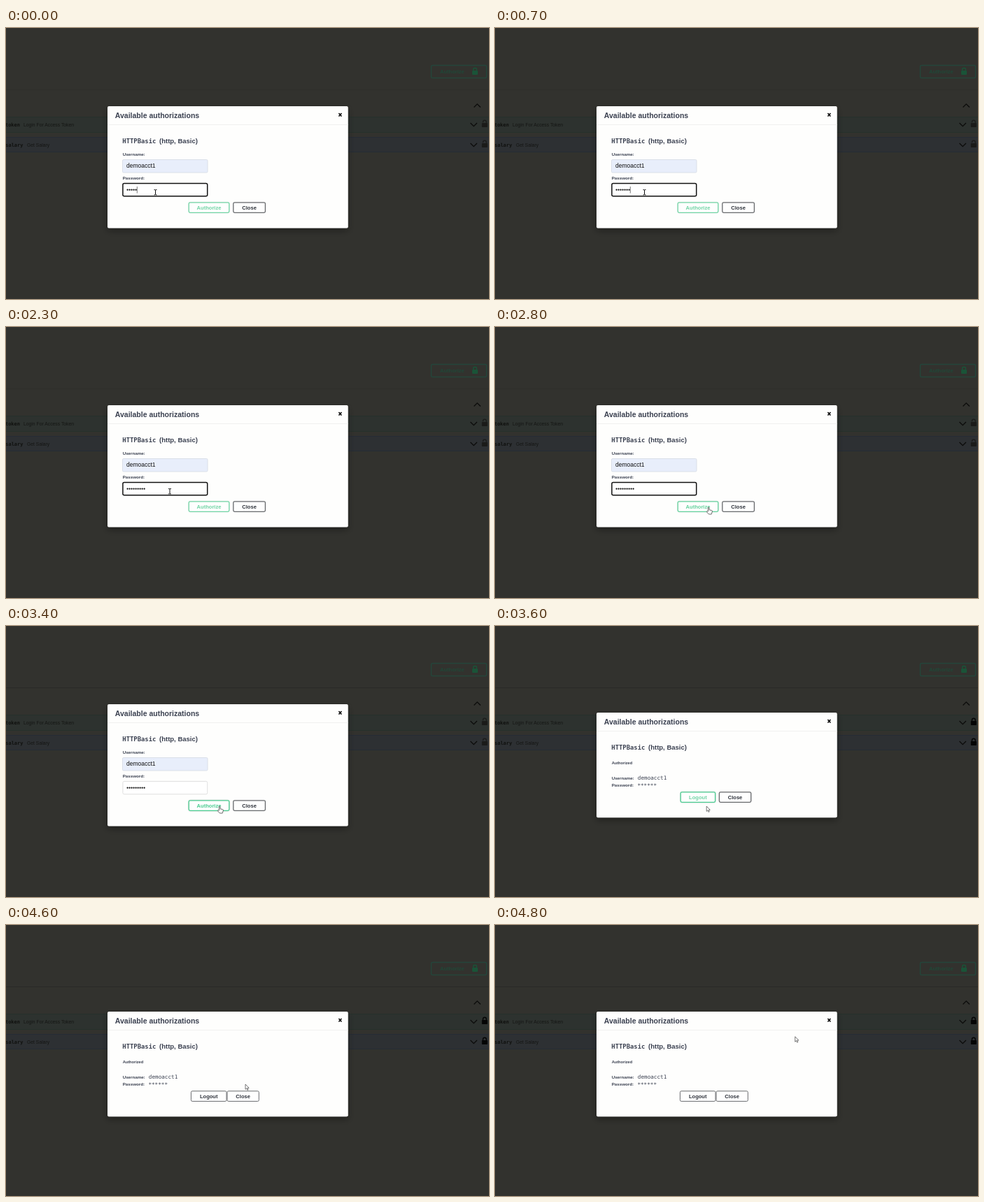
An HTML page for the animation above (4900 ms loop, 690x388 px).

```html
<!DOCTYPE html>
<html lang="en">
<head>
<meta charset="utf-8">
<title>Available authorizations</title>
<style>
html, body { margin: 0; width: 100%; height: 100%; overflow: hidden; background: #32322e; }
svg { display: block; width: 690px; height: 388px; }
text { font-family: "Liberation Sans", Arial, sans-serif; fill: #3b4151; white-space: pre; }
.b { font-weight: 700; }
.mono { font-family: "DejaVu Sans Mono", monospace; }
.mid { text-anchor: middle; }
.end { text-anchor: end; }
.title { font-size: 10.5px; }
.label { font-size: 6.2px; }
.btn text { font-size: 7.55px; font-weight: 700; text-anchor: middle; }
.path { font-size: 7px; fill: #10110f; }
.note { font-size: 6.8px; fill: #151614; }
.chev { fill: none; stroke: #0c0c0b; stroke-width: 1.3; }
</style>
</head>
<body>
<svg viewBox="0 0 690 388" xmlns="http://www.w3.org/2000/svg">
  <defs>
    <filter id="drop" x="-10%" y="-15%" width="120%" height="135%">
      <feDropShadow dx="0" dy="4" stdDeviation="5" flood-color="#000" flood-opacity=".35"/>
    </filter>
    <filter id="glow" x="-20%" y="-50%" width="140%" height="200%">
      <feGaussianBlur stdDeviation="1.3"/>
    </filter>
    <g id="closed">
      <rect x="-4" y="-1" width="8" height="6" rx=".8"/>
      <path d="M-2.4 0V-2.4a2.4 2.4 0 0 1 4.8 0V0" fill="none" stroke="currentColor" stroke-width="1.4"/>
    </g>
    <g id="open">
      <rect x="-4" y="-1" width="8" height="6" rx=".8"/>
      <path d="M2.4 0V-2.4a2.4 2.4 0 0 0 -4.8 0V-1.8" fill="none" stroke="currentColor" stroke-width="1.2"/>
    </g>
  </defs>

  <!-- dimmed page -->
  <rect width="690" height="388" fill="#32322e"/>
  <path id="rule" d="M0 88.5H690" stroke="#292927"/>
  <rect x="607.5" y="53.5" width="79" height="18" rx="2" fill="none" stroke="#24453a" stroke-width="1.4"/>
  <text class="b" x="620" y="65" font-size="7.55" style="fill:#204838">Authorize</text>
  <use href="#closed" x="670" y="62" fill="#1a5338" color="#1a5338"/>
  <path class="chev" d="M668.5 113.5l4.7-4.7 4.7 4.7"/>
  <rect x="-5" y="127.5" width="700" height="22" fill="#2d322f" stroke="#26302b"/>
  <rect x="-5" y="156.5" width="700" height="21" fill="#2d3033" stroke="#252c35"/>
  <text class="path b mono end" x="20" y="141">/token</text>
  <text class="note" x="25" y="140.7">Login For Access Token</text>
  <text class="path b mono end" x="24.5" y="170">/salary</text>
  <text class="note" x="30" y="169.7">Get Salary</text>
  <path class="chev" d="M663.5 136l4.7 4.7 4.7-4.7M663.5 165l4.7 4.7 4.7-4.7"/>
  <g id="unlocked" fill="#1b1b19" color="#1b1b19">
    <use href="#open" x="683.8" y="137"/><use href="#open" x="683.8" y="166"/>
  </g>
  <g id="locked" fill="#050505" color="#050505">
    <use href="#closed" x="683.8" y="137"/><use href="#closed" x="683.8" y="166"/>
  </g>

  <!-- dialog -->
  <rect id="panel" x="145" width="343.7" rx="2" fill="#fefefd" filter="url(#drop)"/>
  <g id="head">
    <text class="title b" x="155.8" y="128.5">Available authorizations</text>
    <path d="M475.4 122l4 4.6M479.4 122l-4 4.6" stroke="#080808" stroke-width="1.6"/>
    <path d="M145 138.5H488.7" stroke="#ececec" stroke-width=".8"/>
    <text class="b mono" x="166.3" y="165" font-size="8.87">HTTPBasic</text>
    <text class="b" x="219" y="165" font-size="9.5">(http, Basic)</text>
  </g>

  <g id="form">
    <text class="label b" x="166.7" y="183">Username:</text>
    <rect x="166.5" y="188.5" width="121.5" height="18.5" rx="1.5" fill="#e8eefb" stroke="#d5dae4" stroke-width=".8"/>
    <text x="172" y="200.4" font-size="8.5" style="fill:#111">demoacct1</text>
    <text class="label b" x="166.7" y="217.3">Password:</text>
    <rect id="field" x="166.9" y="222.4" width="120.8" height="18.4" rx="2" fill="#fff"/>
    <g id="dots" fill="#111"></g>
    <path id="caret" d="M0 227V236.5" stroke="#555" stroke-width=".8"/>
  </g>

  <g id="done">
    <text class="b" x="166.7" y="198" font-size="5.65">Authorized</text>
    <text class="label b" x="166.7" y="220">Username:</text>
    <text class="mono" x="203.8" y="220.3" font-size="7.66">demoacct1</text>
    <text class="label b" x="166.7" y="229.8">Password:</text>
    <text class="mono" x="203.4" y="230.6" font-size="7.66">******</text>
  </g>
  <g id="buttons"></g>

  <!-- pointers -->
  <path id="beam" d="M-2-3.6H-.5L0-3.2 .5-3.6H2M0-3.2V3.2M-2 3.6H-.5L0 3.2 .5 3.6H2" fill="none" stroke="#111" stroke-width="1"/>
  <path id="arrow" d="M0 0V7.4L1.7 5.8 2.9 8.4 4.1 7.8 2.9 5.3H5.1Z" fill="#fff" stroke="#555" stroke-width=".8" stroke-linejoin="round"/>
  <path id="hand" d="M1.4 6V.9a.8.8 0 0 1 1.6 0V3.8L6.6 4.6a1 1 0 0 1 .8 1L6.8 8.2 6.2 10H2.4L-.4 6.9a.7.7 0 0 1 1-1Z" fill="#fff" stroke="#444" stroke-width=".8" stroke-linejoin="round"/>
</svg>
<script>
const LOOP = 4900, STEP = 100;
const $ = id => document.getElementById(id);
const NS = 'http://www.w3.org/2000/svg';
const GREEN = [73, 204, 144], PALE = [112, 212, 164], DARK = [45, 49, 58], GREY = [105, 107, 110];

function make(tag, parent, attrs = {}) {
  const el = document.createElementNS(NS, tag);
  set(el, attrs);
  return parent.appendChild(el);
}
function set(el, attrs) {
  for (const k in attrs) el.setAttribute(k, attrs[k]);
}
const show = (el, on) => el.setAttribute('visibility', on ? 'visible' : 'hidden');
const lerp = (a, b, u) => a + (b - a) * u;
const mix = (a, b, u) => `rgb(${a.map((v, i) => Math.round(lerp(v, b[i], u)))})`;
const ramp = (t, from, to) => Math.min(1, Math.max(0, (t - from) / (to - from)));

function button(label) {
  const g = make('g', $('buttons'), { class: 'btn' });
  const glow = make('rect', g, { rx: 2, fill: '#000', filter: 'url(#glow)' });
  const box = make('rect', g, { rx: 1.8, fill: '#fefefe' });
  const text = make('text', g);
  text.textContent = label;
  return { g, glow, box, text };
}
function place(b, x, y, w, line, ink, glow, weight = 1.3) {
  const size = { x, y, width: w, height: 14.6 };
  set(b.glow, { ...size, opacity: glow });
  set(b.box, { ...size, stroke: line, 'stroke-width': weight });
  set(b.text, { x: x + w / 2, y: y + 9.9 });
  b.text.style.fill = ink;
}

const authorize = button('Authorize'), close = button('Close'), logout = button('Logout');
const dots = Array.from({ length: 9 }, (_, i) =>
  make('circle', $('dots'), { cx: 173.6 + 3 * i, cy: 231.7, r: 1.15 }));

const typed = [[0, 5], [100, 6], [700, 7], [900, 8], [1300, 9]];
// time, x, y, pointer shape
const mouse = [
  [0, 213.5, 235.2, 'beam'], [2300, 234, 235.2, 'beam'], [2400, 255, 238, 'beam'],
  [2500, 274, 245, 'arrow'], [2600, 290, 252, 'hand'], [2700, 299, 256, 'hand'],
  [2800, 303, 258, 'hand'], [3600, 302.2, 258, 'arrow'], [4600, 342, 228, 'arrow'],
  [4700, 398, 184, 'arrow'], [4800, 428.7, 159.8, 'arrow']
];
const at = (table, t) => table.filter(row => row[0] <= t).pop();

function draw(time) {
  const t = Math.floor(time / STEP) * STEP;
  const done = t >= 3600, focused = t < 3400;

  set($('rule'), { opacity: t < 2900 ? .4 : 1 });
  show($('locked'), done);
  show($('unlocked'), !done);
  set($('panel'), done ? { y: 124, height: 150.3 } : { y: 112, height: 174.5 });
  set($('head'), { transform: `translate(0 ${done ? 12 : 0})` });
  $('form').style.display = done ? 'none' : '';
  $('done').style.display = done ? '' : 'none';
  authorize.g.style.display = done ? 'none' : '';
  logout.g.style.display = done ? '' : 'none';

  const count = at(typed, t)[1];
  dots.forEach((dot, i) => show(dot, i < count));
  set($('caret'), { transform: `translate(${172.3 + 3 * count} 0)` });
  show($('caret'), !done && (t < 1800 || (t >= 2400 && t < 2800)));
  set($('field'), focused ? { stroke: '#111', 'stroke-width': 1.5 } : { stroke: '#d8d8d8', 'stroke-width': .8 });

  if (done) {
    const u = ramp(t, 3600, 3900), w = lerp(1.3, 1, u);
    place(logout, lerp(265.2, 264.4, u), 237.8, lerp(49.4, 50.6, u), mix(GREEN, GREY, u), mix(PALE, DARK, u), .3 * (1 - u), w);
    place(close, lerp(320.4, 316, u), 237.8, 45.3, mix(GREY, GREY, u), mix(DARK, DARK, u), .15 * (1 - u), w);
  } else {
    const hover = ramp(t, 2700, 3000);
    place(authorize, 261.2, 249.8, 57.6, mix(PALE, GREEN, hover), mix(PALE, GREEN, hover), lerp(.13, .35, hover));
    place(close, 324.8, 249.8, 45.6, mix(GREY, GREY, 0), mix(DARK, DARK, 0), .13);
  }

  const [, x, y, shape] = at(mouse, t);
  for (const id of ['beam', 'arrow', 'hand']) show($(id), id === shape);
  set($(shape), { transform: `translate(${x} ${y})` });
}

const start = performance.now();
function tick() {
  draw((performance.now() - start) % LOOP);
  requestAnimationFrame(tick);
}
tick();
</script>
</body>
</html>
```
